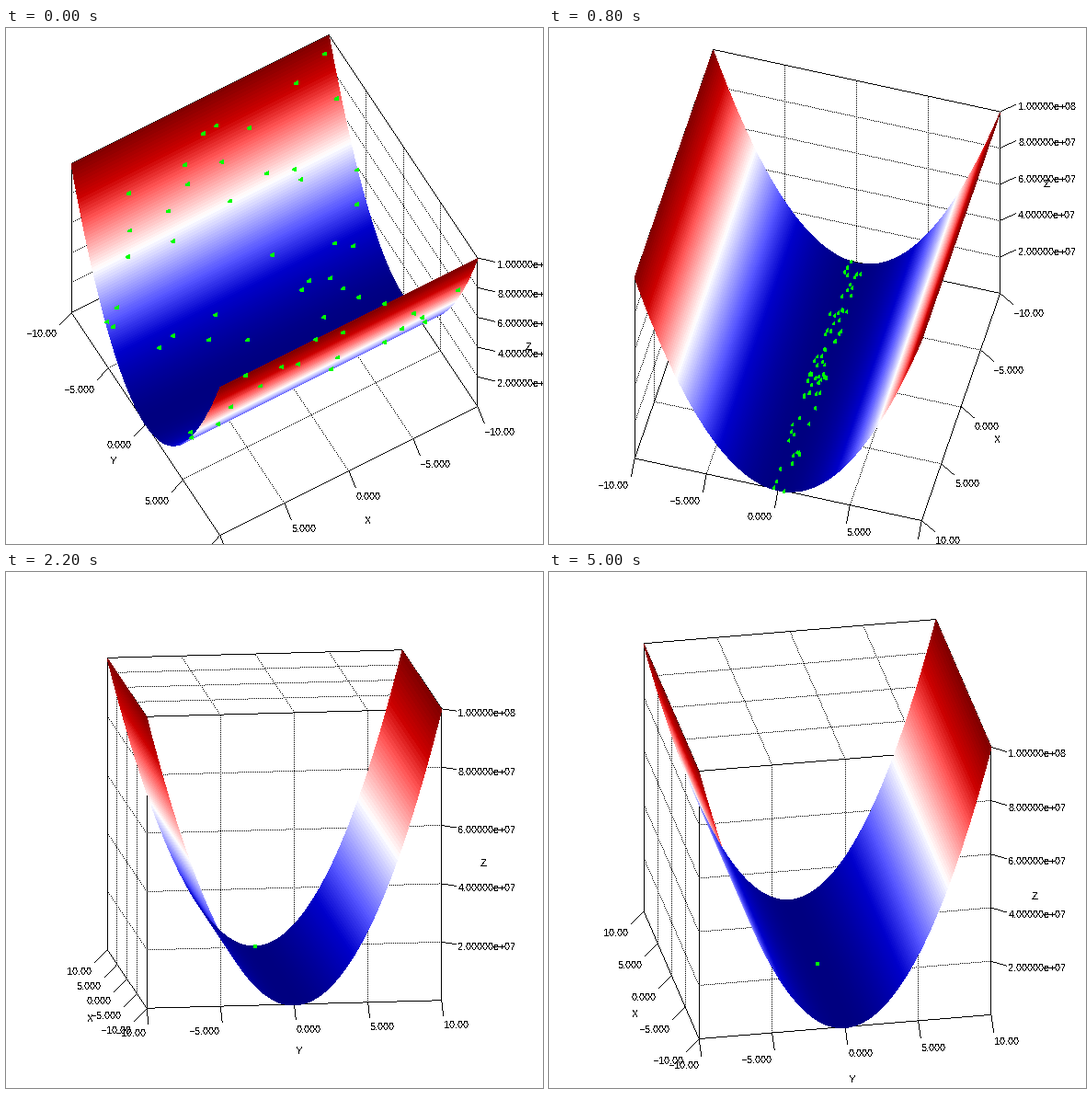
Animation of 584x561 px, one loop 5300 ms. Source, as a matplotlib script:

```python
import numpy as np
import matplotlib.pyplot as plt
from matplotlib.animation import FuncAnimation
from matplotlib.collections import PolyCollection

W, H, DPI = 584, 561, 64
PX = 72 / DPI                 # one pixel in points
HALF = 161.75                 # half the cube's side in pixels
FRAMES, STEP = 53, 100
STRIPS, OVERLAP = 240, 4

plt.rcParams.update({
    "font.family": "Liberation Sans",
    "text.antialiased": False,
    "text.hinting": "native",
    "text.hinting_factor": 1,
})

# Camera key poses in degrees
POSE_FRAMES = 0, 4, 8, 14, 22, 25
AZIMUTH = 60, 26.65, 15.3, 10.7, 7.6, 10.7
ELEVATION = 60, 57.8, 52.4, 40, -11.5, -25.9

rng = np.random.default_rng(11)
COUNT = 70
x_start = rng.uniform(-1, 1, COUNT)
y_start = rng.uniform(-1, 1, COUNT)
x_start[:2] = 1, -1


def glide(t, times, values):
    """Monotone cubic interpolation that comes to rest at the last key."""
    times, values = np.array(times), np.array(values)
    t = min(t, times[-1])
    d = np.diff(values) / np.diff(times)
    inner = np.where(d[:-1] * d[1:] > 0, 2 * d[:-1] * d[1:] / (d[:-1] + d[1:]), 0)
    slope = np.concatenate([d[:1], inner, [0]])
    i = min(np.searchsorted(times, t, side="right") - 1, len(d) - 1)
    h = times[i + 1] - times[i]
    u = (t - times[i]) / h
    blend = u * u * (3 - 2 * u)
    return (values[i] * (1 - blend) + values[i + 1] * blend
            + h * u * (1 - u) * (slope[i] * (1 - u) - slope[i + 1] * u))


class View:
    """Parallel projection of the cube [-1, 1]^3 onto the stage."""

    def __init__(self, frame):
        a = np.radians(glide(frame, POSE_FRAMES, AZIMUTH))
        e = np.radians(glide(frame, POSE_FRAMES, ELEVATION))
        self.above = e > 0
        self.right = np.array([-np.sin(a), np.cos(a), 0])
        self.up = np.array([-np.sin(e) * np.cos(a), -np.sin(e) * np.sin(a), np.cos(e)])
        self.toward = np.cross(self.right, self.up)

    def __call__(self, points):
        p = np.asarray(points, float)
        return np.stack([W / 2 + HALF * (p @ self.right),
                         H / 2 - HALF * (p @ self.up)], axis=-1)

    def hidden(self, x, y):
        """True where a nearer sheet of the valley covers the point."""
        vx, vy, vz = self.toward
        y2 = vz / (2 * vy) - y
        x2 = x + (y2 - y) * vx / vy
        return (y2 > y) & (y2 <= 1) & (np.abs(x2) <= 1)


def valley(x, y):
    x, y = np.broadcast_arrays(x, y)
    return np.stack([x, y, 2 * y**2 - 1], axis=-1)


def height_colors(z):
    """Dark blue through white to dark red for z from 0 to 1."""
    d = np.abs(2 * z - 1)
    strong = np.clip(1.4 - 0.9 * d, 0, 1)
    weak = np.clip(1 - 1.5 * d, 0, 1)
    return np.stack([np.where(z > 0.5, strong, weak), weak,
                     np.where(z > 0.5, weak, strong)], axis=-1)


def box_edges(back):
    """Outlines of the three rear faces; back is the height of the flat one."""
    ring = [(-1, -1), (1, -1), (1, 1), (-1, 1)]
    edges = [((*p, back), (*q, back)) for p, q in zip(ring, ring[1:] + ring[:1])]
    for p in (ring[1], ring[3]):
        edges += [((*p, -1), (*p, 1)), ((-1, -1, -back), (*p, -back))]
    return edges + [((-1, -1, -1), (-1, -1, 1))]


def grid_lines(back):
    lines = []
    for u in (-0.5, 0, 0.5):
        lines += [((u, -1, back), (u, 1, back)), ((u, -1, -1), (u, -1, 1)),
                  ((-1, u, back), (1, u, back)), ((-1, u, -1), (-1, u, 1))]
    for w in (-0.6, -0.2, 0.2, 0.6):
        lines += [((-1, -1, w), (1, -1, w)), ((-1, -1, w), (-1, 1, w))]
    return lines


def pixels(segments, step):
    """Every step-th pixel along each segment."""
    dots = []
    for p, q in segments:
        n = max(np.abs(q - p).max(), 1)
        dots.append(p + np.arange(0, n, step)[:, None] / n * (q - p))
    return np.floor(np.concatenate(dots))


def axis_specs(side):
    """For each axis: title, outward direction, ticks as (label, point)."""
    fifths = [(f"{v:#.4g}".replace("-", "\u2212"), v / 10) for v in range(-10, 11, 5)]
    return [
        ("X", (0, side, -1), [(text, (v, side, -1)) for text, v in fifths]),
        ("Y", (side, 0, -1), [(text, (side, v, -1)) for text, v in fifths]),
        ("Z", (-1, 1, 0), [(f"{k * 2e7:.5e}", (-1, 1, 0.4 * k - 1))
                           for k in range(1, 6)]),
    ]


def swarm(frame):
    """Particles gather on the valley line, then at its middle."""
    along = np.exp(-(max(frame - 22, 0) / 9.6) ** 2)
    across = 10 ** (-frame / 6.6)
    crowd = min(frame / 10, 1.5)
    return along * x_start * np.abs(x_start) ** crowd, across * y_start


fig = plt.figure(figsize=(W / DPI, H / DPI), dpi=DPI, facecolor="white")
ax = fig.add_axes([0, 0, 1, 1])
ax.set_xlim(0, W)
ax.set_ylim(H, 0)
ax.axis("off")

ink, = ax.plot([], [], ",", color="black", antialiased=False, zorder=1)

y_edges = np.linspace(-1, 1, STRIPS + 1)
y_mid = (y_edges[1:] + y_edges[:-1]) / 2
surface = PolyCollection([], facecolors=height_colors(y_mid**2), edgecolors="none",
                         antialiaseds=False, zorder=2)
particles = PolyCollection([], facecolors="#00ff00", edgecolors="none",
                           antialiaseds=False, zorder=3)
for shapes in (surface, particles):
    ax.add_collection(shapes, autolim=False)
labels = [ax.text(0, 0, "", fontsize=11 * PX, color="black", va="baseline", zorder=4)
          for _ in range(18)]


def put(label, text, x, y, ha):
    label.set_text(text)
    label.set_position((x, y))
    label.set_ha(ha)
    label.set_visible(y <= H + 1)


def draw_axes(view):
    """Place all labels and return the tick marks."""
    pool = iter(labels)
    ticks = []
    for title, out, marks in axis_specs(1 if view.above else -1):
        out = np.array(out)
        for text, point in marks:
            start, end = view([point, point + 0.09 * out])
            ticks.append((start, end))
            x, y = end
            if title == "Z":
                put(next(pool), text, x + 1.5, y + 5, "left")
            elif x < W / 2:
                put(next(pool), text, x - 2.5, y + 12.5, "right")
            else:
                put(next(pool), text, x + 0.5, y + 12.5, "left")
        x, y = view(1.252 * out if title == "Z" else out + 0.252 * out)
        put(next(pool), title, x, y + 5, "center")
    return ticks


def draw_surface(view):
    # Strips run far to near; each reaches under the next ones to leave no gaps
    far, near = view(valley(-1, y_edges)), view(valley(1, y_edges))
    i = np.arange(STRIPS)
    j = np.minimum(i + OVERLAP, STRIPS)
    surface.set_verts(np.stack([far[i], far[j], near[j], near[i]], axis=1))


def draw_particles(frame, view):
    x, y = swarm(frame)
    shown = ~view.hidden(x, y)
    if view.above:
        w = 0.6 + 1.4 * np.exp(-frame / 7)
        shape = [(-w, 0.2), (w, -2), (w, 1.8), (-w, 1.4)]
    else:
        shape = [(-2, -2), (2, -2), (2, 2), (-2, 2)]
        if frame < POSE_FRAMES[-1]:
            shown[1:] = False
    centres = view(valley(x, y))[shown]
    particles.set_verts([c + np.array(shape) for c in centres])


def update(frame):
    view = View(frame)
    back = -1 if view.above else 1
    solid = list(view(box_edges(back))) + draw_axes(view)
    dotted = view(grid_lines(back))
    ink.set_data(*np.concatenate([pixels(solid, 1), pixels(dotted, 2)]).T)
    draw_surface(view)
    draw_particles(frame, view)
    return [ink, surface, particles, *labels]


anim = FuncAnimation(fig, update, frames=FRAMES, interval=STEP,
                     repeat=True, repeat_delay=0, blit=False)
plt.show()
```
